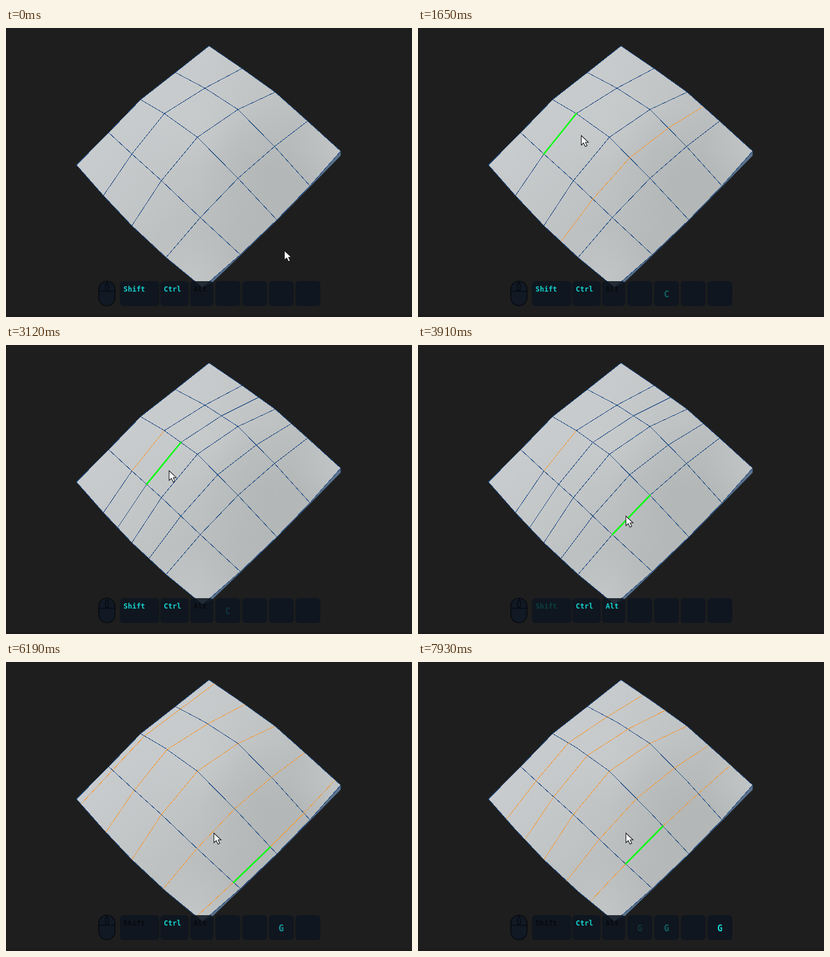
These frames come from a looping animation (700x500 px, 8 s). An HTML page:

```html
<!DOCTYPE html>
<html lang="en">
<head>
<meta charset="utf-8">
<title>Edge loop spacing</title>
<style>
  html, body { margin: 0; width: 100%; height: 100%; overflow: hidden; background: #1e1e1e; }
  svg { display: block; width: 700px; height: 500px; }
  .wire, .sel, .hover { fill: none; stroke-width: 1; }
  .wire, .sel { shape-rendering: crispEdges; }
  .wire { stroke: #234f86; }
  .sel { stroke: #f09a3a; }
  .hover { stroke: #00ff0c; stroke-width: 2.6; stroke-linecap: round; }
  .key { fill: #0d151f; fill-opacity: .87; }
  text { font-family: "DejaVu Sans Mono", "Noto Sans Mono", monospace; font-weight: bold; }
  .mod { font-size: 12.4px; }
  .idle { fill: #070a0e; }
  .on { fill: #18d4d2; }
  .char { font-size: 15px; text-anchor: middle; }
</style>
</head>
<body>
<svg viewBox="0 0 700 500">
  <defs>
    <linearGradient id="base" gradientUnits="userSpaceOnUse" x1="200" y1="120" x2="430" y2="340">
      <stop offset="0" stop-color="#cacdcf"/>
      <stop offset=".45" stop-color="#c3c6c7"/>
      <stop offset="1" stop-color="#b6b9b9"/>
    </linearGradient>
    <radialGradient id="shade">
      <stop offset="0" stop-color="#aeb3b2" stop-opacity=".55"/>
      <stop offset="1" stop-color="#aeb3b2" stop-opacity="0"/>
    </radialGradient>
    <radialGradient id="light">
      <stop offset="0" stop-color="#cacdce" stop-opacity=".6"/>
      <stop offset="1" stop-color="#cacdce" stop-opacity="0"/>
    </radialGradient>
    <clipPath id="inside"><path id="clip"/></clipPath>
  </defs>
  <rect width="700" height="500" fill="#1e1e1e"/>
  <rect y="496" width="700" height="4" fill="#1b1b1b"/>
  <path d="M577 213V221L467 333 357 439 339 449 404 392 467 332 524 273Z" fill="#5f738a" stroke="#2a4a6c" stroke-width=".8"/>
  <path id="face" fill="url(#base)"/>
  <g clip-path="url(#inside)">
    <circle cx="450" cy="255" r="120" fill="url(#shade)"/>
    <circle cx="315" cy="150" r="95" fill="url(#light)"/>
    <circle cx="325" cy="435" r="95" fill="url(#light)"/>
    <circle cx="575" cy="205" r="85" fill="url(#light)"/>
  </g>
  <path id="rim" class="wire"/>
  <path id="wires" class="wire"/>
  <path id="picked" class="sel"/>
  <path id="hover" class="hover"/>
  <path id="mark" d="M0 150.5H1.3M0 153.5H1.3" stroke="#7fc4ee" stroke-width="1.4"/>
  <g id="bar">
    <g stroke="#080b10" stroke-width="1.6" fill="#111925">
      <rect x="160" y="438" width="28" height="42.500" rx="14"/>
      <path d="M160 455.500H188M174 438V455" fill="none"/>
      <rect x="171.500" y="442" width="5" height="12" rx="2.500"/>
    </g>
    <circle id="button" cx="166.500" cy="448.500" r="2.700" fill="none" stroke="#18d4d2" stroke-width="1.500"/>
  </g>
  <g id="click">
    <circle r="12.500" fill="#e2e436" fill-opacity=".8"/>
    <text x="9" y="1" font-size="11">1</text>
  </g>
  <path id="cursor" d="M0 0V16.500L4 13 7 19 10 17.700 7.200 11.800H12.300Z" fill="#fff" stroke="#15171c" stroke-width="1.100"/>
</svg>
<script>
const LOOP = 8000;
const STEP = 290;       // time a key stays in one slot
const ADD_FIRST = 320, ADD_SECOND = 1890, PICK_EDGE = 2750, PICK_RING = 4540, SLIDE = 6040;
const SWING = 473;
const $ = id => document.getElementById(id);
const mix = (a, b, k) => a + (b - a) * k;
const clamp = (v, lo, hi) => Math.min(hi, Math.max(lo, v));

// Control net: five rows running from upper left to lower right
const net = [
  [[350, 31], [407, 70], [464, 111], [520, 161], [577, 213]],
  [[292, 77], [343, 104], [400, 141], [463, 205], [524, 273]],
  [[232, 124], [273, 148], [330, 189], [400, 260], [467, 332]],
  [[177, 181], [217, 218], [268, 264], [335, 328], [404, 392]],
  [[121.5, 237], [168, 290], [217, 342], [276, 397], [339, 449]]
];
const between = (p, q, k) => [mix(p[0], q[0], k), mix(p[1], q[1], k)];
const path = pts => "M" + pts.map(p => p.map(v => v.toFixed(1)).join(" ")).join("L");

function onRow(row, u) {
  const j = Math.min(3, Math.floor(u));
  return between(row[j], row[j + 1], u - j);
}

const column = j => net.map(row => row[j]);
const outline = path([...net[0], ...column(4), ...[...net[4]].reverse(), ...column(0).reverse()]) + "Z";
for (const id of ["face", "clip", "rim"]) $(id).setAttribute("d", outline);
const rows = net.slice(1, 4).map(path).join("");

// Key bar
function add(tag, className, attrs, text = "") {
  const el = document.createElementNS("http://www.w3.org/2000/svg", tag);
  el.setAttribute("class", className);
  for (const name in attrs) el.setAttribute(name, attrs[name]);
  el.textContent = text;
  return $("bar").appendChild(el);
}
const keycap = (x, width) => add("rect", "key", { x, y: 438, width, height: 43, rx: 6 });

function modifier(name, x, width) {
  keycap(x, width);
  const spot = { x: x + 6, y: 456 };
  add("text", "mod idle", spot, name);
  return add("text", "mod on", spot, name);
}
const shift = modifier("Shift", 196.5, 68);
modifier("Ctrl", 266, 49);
const alt = modifier("Alt", 317.5, 40);
const slots = [0, 1, 2, 3].map(n => {
  const x = 361 + 46 * n;
  keycap(x, 43);
  return add("text", "char on", { x: x + 21.5, y: 466, opacity: mix(.16, 1, (n / 3) ** 1.2) });
});

const presses = [["C", 390], ["C", 2190], ["E", 4100],
  ["G", 5870], ["G", 6400], ["G", 7000], ["G", 7220], ["G", 7850]];

// The bar stands still while the screen is not redrawn.
const clock = t => t - clamp(t - 400, 0, 470) - clamp(t - 5250, 0, 550);

function held(t, down, up) {
  if (t < down) return 0;
  return (1 - clamp((t - up) / 600, 0, 1)) ** 2;
}

// Cursor stops: arrival, departure, place
const stops = [[0, 80, 480, 385], [ADD_FIRST, 1000, 355.5, 222], [1650, 2490, 281.5, 186],
  [2740, 2850, 245, 181], [3700, LOOP, 358.5, 296]];

function cursorAt(t) {
  const i = stops.findLastIndex(s => s[0] <= t);
  const [, leave, ...from] = stops[i];
  if (t <= leave) return from;
  const [arrive, , ...to] = stops[i + 1];
  return between(from, to, (t - leave) / (arrive - leave));
}

// Distance of the outer loops from the middle one
function spread(t) {
  if (t < SLIDE) return 1;
  const phase = (t - SLIDE) / SWING;
  return 4 / 3 + (phase < 2 ? .55 * Math.max(0, Math.sin(phase * 2 * Math.PI)) : 0);
}

const inner = line => line.slice(2, 4);

function nearest(lines, exists, [x, y]) {
  const gaps = lines.map((line, n) => {
    const [mx, my] = between(...inner(line), .5);
    return exists[n] ? Math.hypot(mx - x, my - y) : Infinity;
  });
  return gaps.indexOf(Math.min(...gaps));
}

const show = (el, on) => el.setAttribute("visibility", on ? "visible" : "hidden");

function render(t) {
  const reach = spread(t);
  const lines = [-1, -.5, 0, .5, 1].map(k => net.map(row => onRow(row, 2 + k * reach)));
  const exists = [true, t >= ADD_SECOND, true, t >= ADD_FIRST, true];
  const picked = n => t >= PICK_RING || (t < PICK_EDGE && n % 2 === 1);
  let wires = rows, orange = "";
  lines.forEach((line, n) => {
    if (!exists[n]) return;
    if (picked(n)) orange += path(line);
    else wires += path(line);
  });
  if (t >= PICK_EDGE && t < PICK_RING) orange += path(inner(lines[0]));
  $("wires").setAttribute("d", wires);
  $("picked").setAttribute("d", orange);

  const pos = cursorAt(t);
  const over = t >= PICK_RING ? 4 : nearest(lines, exists, pos);
  $("hover").setAttribute("d", t > 1000 ? path(inner(lines[over])) : "");

  const cutting = (t >= ADD_FIRST && t < 1000) || (t >= ADD_SECOND && t < 2150);
  for (const id of ["cursor", "click"]) $(id).setAttribute("transform", `translate(${pos})`);
  for (const id of ["click", "button", "mark"]) show($(id), cutting);

  shift.setAttribute("opacity", t < 3040 ? held(t, 0, 2040) : held(t, 3040, 3620));
  alt.setAttribute("opacity", held(t, 3830, 4700));
  const chars = ["", "", "", ""];
  for (const [char, at] of presses) {
    const moved = Math.floor((clock(t) - clock(at)) / STEP);
    if (moved >= 0 && moved < 4) chars[3 - moved] = char;
  }
  slots.forEach((el, n) => { el.textContent = chars[n]; });
}

const start = performance.now();
function tick() {
  render((performance.now() - start) % LOOP);
  requestAnimationFrame(tick);
}
tick();
</script>
</body>
</html>
```
